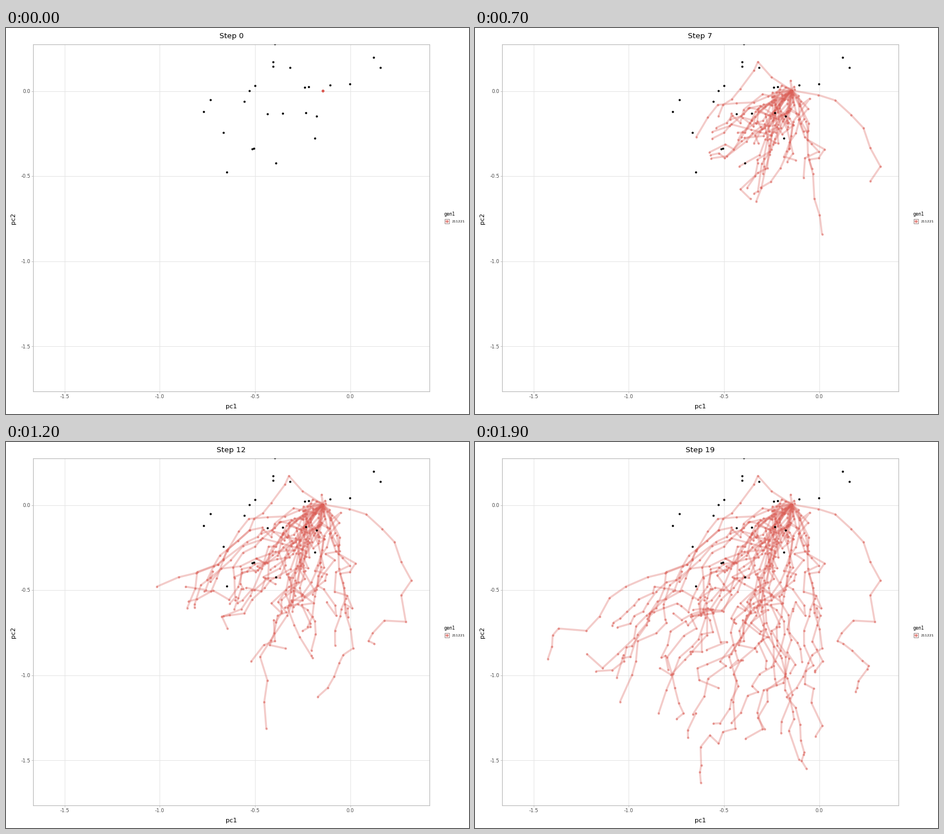
These frames come from a looping animation (820x683 px, 2 s). A matplotlib script:

```python
import numpy as np
import matplotlib.pyplot as plt
from matplotlib.animation import FuncAnimation
from matplotlib.collections import LineCollection
from matplotlib.patches import Rectangle

W, H, DPI = 820, 683, 64
PT = 72 / DPI  # points per pixel
LEFT, RIGHT, TOP, BOTTOM = 48, 750, 29, 642.5
STEPS = 20
START = (561, 110.5)
RED = "#db5f57"
LINE_ALPHA, DOT_ALPHA = 0.32, 0.6

plt.rcParams["font.family"] = "DejaVu Sans"
rng = np.random.default_rng(21)

# Fixed observations, in stage pixels
DOTS = [
    (476, 27.6), (472.5, 60), (472.5, 68), (502.5, 69.5), (650.5, 52),
    (662.5, 69.5), (440.5, 101.5), (431, 110.5), (529, 104.5), (535.5, 103.5),
    (573.5, 100.5), (608.5, 99), (362, 127), (421.5, 130), (349.5, 148),
    (463, 151.5), (490, 151), (531, 149.5), (550, 155.5), (384.5, 185),
    (546.5, 195), (436, 213.5), (439, 213), (478, 238.5), (390.5, 254.5),
]

# Waypoints (step, x, y) of the outermost walks
OUTER = [
    [(2, 638, 128), (4, 688, 177), (6, 718, 245), (8, 708, 318),
     (9, 670, 316), (11, 642, 352), (15, 697, 396), (19, 674, 442)],
    [(5, 430, 136), (9, 376, 217), (12, 267, 256), (15, 197, 334),
     (16, 148, 330), (19, 129, 384)],
    [(7, 498, 307), (9, 450, 380), (12, 461, 507), (15, 416, 519),
     (19, 400, 603)],
    [(5, 601, 302), (12, 552, 451), (15, 577, 528), (19, 587, 578)],
    [(2, 501, 60), (5, 455, 126), (19, 252, 328)],
]
INNER = 31


def bridge(a, b, n, spread):
    """Random walk of n steps pinned at both ends."""
    s = np.linspace(0, 1, n + 1)[:, None]
    noise = np.vstack([np.zeros(2), rng.normal(0, spread, (n, 2)).cumsum(0)])
    return a + np.subtract(b, a) * s + noise - noise[-1] * s


def make_walk(stops, spread):
    walk = np.zeros((STEPS, 2))
    walk[0] = START
    last = 0
    for step, *point in stops:
        walk[last:step + 1] = bridge(walk[last], point, step - last, spread)
        last = step
    return walk


def fan_end(i):
    """Inner walks end in a fan from straight down to the lower left."""
    angle = np.radians(-8 + 64 * i / (INNER - 1))
    reach = rng.normal(435, 35) if i % 2 else rng.normal(315, 45)
    return START[0] - reach * np.sin(angle), START[1] + reach * np.cos(angle)


walks = np.array([make_walk(stops, 8) for stops in OUTER]
                 + [make_walk([(STEPS - 1, *fan_end(i))], 14)
                    for i in range(INNER)])

fig = plt.figure(figsize=(W / DPI, H / DPI), dpi=DPI, facecolor="white")
ax = fig.add_axes([LEFT / W, 1 - BOTTOM / H,
                   (RIGHT - LEFT) / W, (BOTTOM - TOP) / H])


def px(v):
    return 609.6 + 337.3 * v


def py(v):
    return 111.5 - 301.3 * v


ticks = np.arange(-1.5, 0.1, 0.5)
ax.set_xticks(px(ticks), [])
ax.set_yticks(py(ticks), [])
ax.tick_params(length=3 * PT, width=PT, color="#c4c4c4")
ax.grid(color="#e4e4e4", lw=PT)
ax.set_axisbelow(True)
for spine in ax.spines.values():
    spine.set(color="#b8b8b8", linewidth=1.1 * PT)


def label(x, y, text, size, color="black", ha="center", **kw):
    return ax.text(x, y, text, fontsize=size * PT, color=color, ha=ha,
                   va="baseline", **kw)


for v in ticks:
    label(px(v), 655, f"{v:.1f}", 8.8, "#4d4d4d")
    label(43.5, py(v) + 3.2, f"{v:.1f}", 8.8, "#4d4d4d", "right")
title = label(399, 18, "", 13.2)
label(399, 673, "pc1", 11)
label(16.5, 336.5, "pc2", 11, rotation=90, rotation_mode="anchor")

# Legend
label(776, 331.5, "gen1", 8, ha="left")
label(789.5, 343.5, "211221", 6, ha="left")
ax.add_patch(Rectangle((777, 338), 7.5, 7.5, fc="white", ec="#8f8080",
                       lw=0.9 * PT, clip_on=False))
ax.plot([777.5, 784], [341.7, 341.7], color=RED, alpha=LINE_ALPHA,
        lw=3.5 * PT, solid_capstyle="butt", clip_on=False)
ax.plot(780.7, 341.7, "o", color=RED, alpha=DOT_ALPHA, ms=5 * PT, mew=0,
        clip_on=False)

lines = LineCollection([], colors=RED, alpha=LINE_ALPHA, linewidths=3.4 * PT,
                       zorder=3)
ax.add_collection(lines, autolim=False)
nodes = ax.scatter([], [], s=(4 * PT) ** 2, color=RED, alpha=DOT_ALPHA,
                   linewidths=0, zorder=4)
ax.scatter(*np.transpose(DOTS), s=(3.8 * PT) ** 2, color="black",
           linewidths=0, zorder=5)
ax.set(xlim=(LEFT, RIGHT), ylim=(BOTTOM, TOP))


def update(step):
    shown = walks[:, :step + 1]
    lines.set_segments(list(shown))
    nodes.set_offsets(shown.reshape(-1, 2))
    title.set_text(f"Step {step}")
    return lines, nodes, title


anim = FuncAnimation(fig, update, frames=STEPS, interval=100, repeat=True,
                     repeat_delay=0)
plt.show()
```
